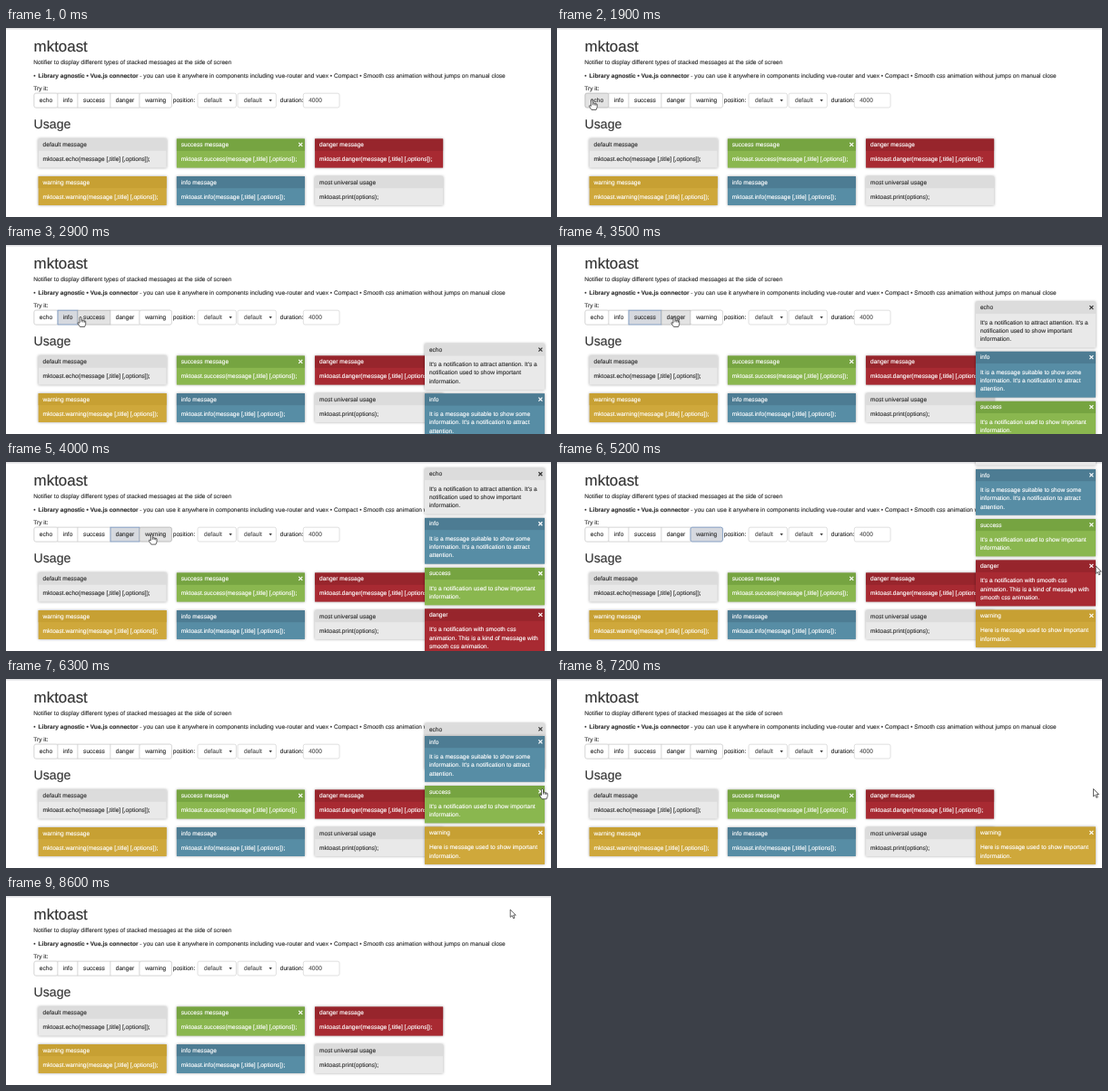
An HTML page that plays this animation: 600x209 px, repeating every 8.8 s.

```html
<!DOCTYPE html>
<html lang="en">
<head>
<meta charset="utf-8">
<title>mktoast</title>
<style>
html, body { margin: 0; width: 100%; height: 100%; overflow: hidden; background: #fff; }
svg { display: block; width: 100%; height: 100%; }
text {
  font: 6.58px "Liberation Sans", Arial, sans-serif;
  color: #333; fill: currentColor; stroke: currentColor; stroke-width: .14px;
  text-rendering: geometricPrecision; white-space: pre;
}
.box { filter: drop-shadow(0 .8px 1.7px rgba(0, 0, 0, .36)); }
</style>
</head>
<body>
<svg id="stage" viewBox="0 0 600 209"></svg>
<script>
const LOOP = 8800, STEP = 100, GROW = 500;
const LINE = 9.4, HEAD = 13.2, GAP = 4.2, FLOOR = 209.2;
const stage = document.getElementById('stage');

function add(parent, tag, attrs, content) {
  const el = document.createElementNS('http://www.w3.org/2000/svg', tag);
  for (const k in attrs) el.setAttribute(k, attrs[k]);
  if (content !== undefined) el.textContent = content;
  parent.appendChild(el);
  return el;
}
const set = (el, attrs) => { for (const k in attrs) el.setAttribute(k, attrs[k]); };
const label = (x, y, s, style = '', parent = stage) => add(parent, 'text', { x, y, style }, s);

// header colour, body colour, text colour
const SKINS = {
  echo: ['#dcdcdc', '#e9e9e9', '#333'],
  info: ['#4d7c93', '#578da5', '#fff'],
  success: ['#76a441', '#8ab74f', '#fff'],
  danger: ['#97252c', '#a82a32', '#fff'],
  warning: ['#c7a033', '#cfa83b', '#fff']
};

function panel(x, y, w, kind, title, lines, closable) {
  const [head, body, ink] = SKINS[kind];
  const h = HEAD + LINE * (lines.length + 1);
  const g = add(stage, 'g', { transform: `translate(${x} ${y})` });
  const box = add(g, 'g', { class: 'box' });
  add(box, 'rect', { width: w, height: h, fill: body });
  add(box, 'rect', { width: w, height: HEAD, fill: head });
  const color = `color:${ink}`;
  label(4.9, 8.5, title, color, g);
  lines.forEach((s, i) => label(4.9, 24.7 + i * LINE, s, color, g));
  if (closable) {
    add(g, 'path', { d: `M${w - 6.6} 4.3l4 4m0-4l-4 4`, stroke: ink, 'stroke-width': 1.2 });
  }
  return { g, h };
}

// Page
add(stage, 'rect', { width: 600, height: 209, fill: '#fff' });
add(stage, 'rect', { width: 600, height: 1.6, fill: '#e2e2e4' });
label(30.6, 26, 'mktoast', 'font-size:16.92px');
label(30.2, 40.3, 'Notifier to display different types of stacked messages at the side of screen');
const features = label(30.2, 55.1, '');
add(features, 'tspan', {}, '•');
add(features, 'tspan', { x: 35.6, 'font-weight': 700 }, 'Library agnostic • Vue.js connector');
add(features, 'tspan', {}, ' - you can use it anywhere in components including vue-router and vuex' +
  ' • Compact • Smooth css animation without jumps on manual close');
label(30.2, 69.2, 'Try it:');
label(30.6, 111, 'Usage', 'font-size:14.1px');

const field = (x, w) => add(stage, 'rect', {
  x, y: 72.2, width: w, height: 15.8, rx: 1.9, fill: '#fff', stroke: '#ccc', 'stroke-width': .6
});
label(183.8, 82.4, 'position:');
for (const x of [211, 255]) {
  field(x, 42.4);
  label(x + 7, 82.4, 'default', 'color:#555');
  add(stage, 'path', { d: `M${x + 34.5} 79h3.4l-1.7 2.4z`, fill: '#444' });
}
label(301.8, 82.4, 'duration:');
field(327.3, 39.8);
label(333.2, 82.4, '4000', 'color:#555');

// Button group
field(31, 151.4);
const edges = [31, 57, 79, 115, 147, 182.4];
const buttons = ['echo', 'info', 'success', 'danger', 'warning'].map((name, i) => {
  const x = edges[i], w = edges[i + 1] - x;
  const rect = add(stage, 'rect', {
    x, y: 72.2, width: w, height: 15.8, rx: i % 4 ? 0 : 1.9, 'stroke-width': .6
  });
  label(x + w / 2, 82.4, name, 'text-anchor:middle');
  return { name, x, w, rect };
});

// Usage cards
const call = s => `mktoast.${s}(message [,title] [,options]);`;
[
  ['echo', 'default message', call('echo')],
  ['success', 'success message', call('success')],
  ['danger', 'danger message', call('danger')],
  ['warning', 'warning message', call('warning')],
  ['info', 'info message', call('info')],
  ['echo', 'most universal usage', 'mktoast.print(options);']
].forEach(([kind, title, code], i) =>
  panel(35.7 + 152.2 * (i % 3), i < 3 ? 122.6 : 164, 141, kind, title, [code], i === 1));

// Toasts: kind, opening time, closing time, lines
const toasts = [
  ['echo', 2050, 6075, ["It's a notification to attract attention. It's a", 'notification used to show important', 'information.']],
  ['info', 2640, 6650, ['It is a message suitable to show some', "information. It's a notification to attract", 'attention.']],
  ['success', 3250, 6400, ["It's a notification used to show important", 'information.']],
  ['danger', 3720, 5600, ["It's a notification with smooth css", 'animation. This is a kind of message with', 'smooth css animation.']],
  ['warning', 4210, 8050, ['Here is message used to show important', 'information.']]
].map(([kind, open, close, lines]) =>
  ({ kind, open, close, ...panel(461, 300, 132, kind, kind, lines, true) }));

// Pointer
const pointer = add(stage, 'g', { 'stroke-linejoin': 'round' });
const arrow = add(pointer, 'path', {
  d: 'M0 0V8.4L2 6.6L3.4 9.8L4.8 9.2L3.5 6.1H6.1Z', fill: '#fff', stroke: '#222', 'stroke-width': .7
});
const hand = add(pointer, 'path', {
  d: 'M-1 .7Q0-.7 1 .7V4Q2 3.2 2.8 4.2Q3.8 3.6 4.4 4.6Q5.6 4.2 5.7 5.4V8.2L4.6 11.2H-.5L-3 7.4Q-3.4 5.6-1 7Z' +
     'M1 4V6M2.8 4.2V6.2M4.4 4.6V6.4',
  fill: '#fff', stroke: '#222', 'stroke-width': .7
});
const route = [
  [1200, 20, 106], [1700, 38.5, 79.3], [2150, 38.5, 79.3], [2450, 67, 79.3], [2750, 67, 79.3],
  [3050, 97, 79.3], [3280, 97, 79.3], [3450, 129, 79.3], [3800, 129, 79.3], [4050, 164, 80],
  [4220, 164, 80], [4400, 196.3, 92], [4500, 196.3, 92], [5100, 593.2, 115], [5200, 593.2, 115],
  [5450, 590, 117], [5800, 590, 117], [6200, 590.5, 121.5], [7750, 590.5, 121.5],
  [8500, 555.2, 15], [LOOP, 555.2, 15]
];

function pointerAt(t) {
  const i = route.findIndex(p => p[0] > t);
  if (i < 1) return null;
  const [a, b] = [route[i - 1], route[i]];
  const k = (t - a[0]) / (b[0] - a[0]), s = k * k * (3 - 2 * k);
  return { x: a[1] + (b[1] - a[1]) * s, y: a[2] + (b[2] - a[2]) * s };
}

const ease = k => 1 - (1 - Math.min(1, Math.max(0, k))) ** 2.3;

function render(t) {
  // The stack is anchored to the floor; each toast claims its share of space.
  let y = FLOOR;
  for (const o of [...toasts].reverse()) {
    const share = ease((t - o.open) / GROW) - ease((t - o.close) / GROW);
    y -= (o.h + GAP) * share;
    o.y = y;
    o.shown = share > 0;
    set(o.g, { transform: `translate(461 ${y})`, visibility: o.shown ? 'visible' : 'hidden' });
  }

  const p = pointerAt(t);
  const blurred = t >= toasts[3].close;
  const focused = blurred ? null : toasts.filter(o => t >= o.open).pop();
  let over = p && toasts.some(o => o.shown && Math.abs(588 - p.x) < 5 && Math.abs(o.y + 6.6 - p.y) < 6);
  for (const b of buttons) {
    const hover = p && p.x > b.x && p.x < b.x + b.w && p.y > 72 && p.y < 88;
    const focus = focused && focused.kind === b.name;
    over = over || hover;
    set(b.rect, {
      fill: focus ? '#d6d9df' : hover ? '#e3e3e3' : '#fff',
      stroke: focus ? '#7f9cc4' : hover ? '#adadad' : '#ccc',
      'stroke-width': focus ? .9 : .6
    });
  }

  set(pointer, { display: p ? 'inline' : 'none' });
  if (p) set(pointer, { transform: `translate(${p.x} ${p.y})` });
  set(hand, { display: over ? 'inline' : 'none' });
  set(arrow, { display: over ? 'none' : 'inline' });
}

const start = performance.now();
function tick() {
  const t = (performance.now() - start) % LOOP;
  render(Math.min(8600, Math.floor(t / STEP) * STEP));
  requestAnimationFrame(tick);
}
tick();
</script>
</body>
</html>
```
